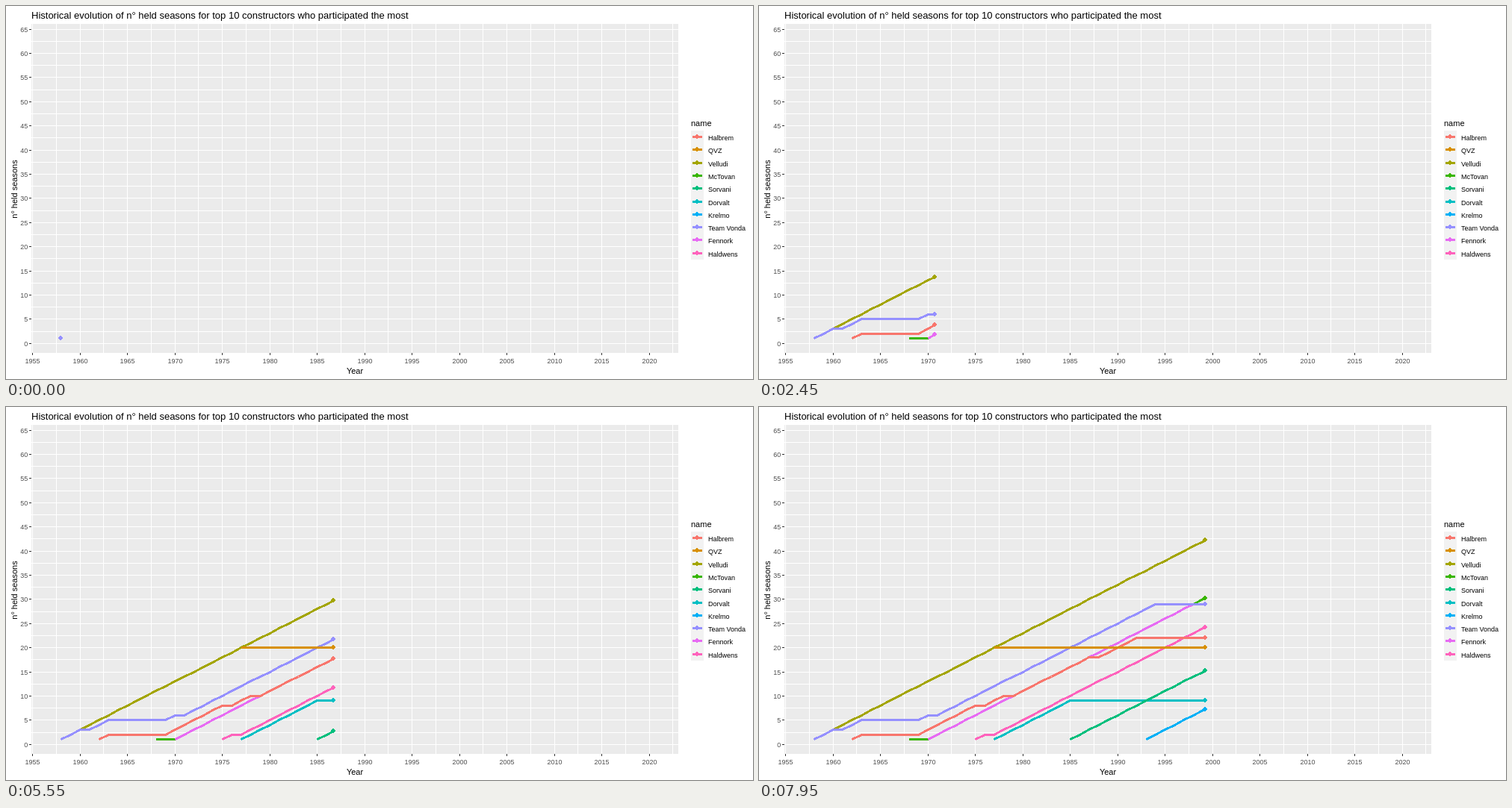
An HTML page for the animation above (8 s loop, 1000x500 px).

```html
<!DOCTYPE html>
<html lang="en">
<head>
<meta charset="utf-8">
<title>Held seasons</title>
<style>
  html, body { margin: 0; width: 100%; height: 100%; overflow: hidden; background: #fff; }
  svg { display: block; width: 1000px; height: 500px; font-family: "Liberation Sans", Arial, sans-serif; }
  .shapes { shape-rendering: crispEdges; }
  .grid { stroke: #fff; }
  .ticks { stroke: #333; }
  .line { fill: none; stroke-width: 3; stroke-linejoin: round; }
  .axis { font-size: 9px; fill: #4d4d4d; }
  .label { font-size: 9px; }
  .heading { font-size: 11px; }
  .title { font-size: 13px; }
  .mid { text-anchor: middle; }
  .end { text-anchor: end; }
</style>
</head>
<body>
<svg id="chart" viewBox="0 0 1000 500"></svg>
<script>
const LOOP = 8000, STEP = 50, START = 1958, SPAN = 62, FRAMES = 239;
const DOT = 'M-1-3h2v1h1v1h1v2h-1v1h-1v1h-2v-1h-1v-1h-1v-2h1v-1h1z';

// Legend order; knots are [year, seasons], straight in between.
const teams = [
  { name: 'Halbrem', color: '#F8766D', knots: [[1962, 1], [1963, 2], [1969, 2], [1975, 8], [1976, 8], [1978, 10],
    [1979, 10], [1987, 18], [1988, 18], [1992, 22], [2020, 22]] },
  { name: 'QVZ', color: '#D89000', knots: [[1977, 20], [2020, 20]] },
  { name: 'Velludi', color: '#A3A500', knots: [[1958, 1], [2020, 63]] },
  { name: 'McTovan', color: '#39B600', knots: [[1968, 1], [1970, 1], [2020, 51]] },
  { name: 'Sorvani', color: '#00BF7D', knots: [[1985, 1], [2020, 36]] },
  { name: 'Dorvalt', color: '#00BFC4', knots: [[1977, 1], [1985, 9], [2020, 9]] },
  { name: 'Krelmo', color: '#00B0F6', knots: [[1993, 1], [2020, 28]] },
  { name: 'Team Vonda', color: '#9590FF', knots: [[1958, 1], [1960, 3], [1961, 3], [1963, 5], [1969, 5], [1970, 6],
    [1971, 6], [1994, 29], [2020, 29]] },
  { name: 'Fennork', color: '#E76BF3', knots: [[1970, 1], [1998, 29], [2020, 29]] },
  { name: 'Haldwens', color: '#FF62BC', knots: [[1975, 1], [1976, 2], [1977, 2], [2020, 45]] }
];
const drawOrder = [2, 3, 9, 5, 6, 4, 8, 7, 0, 1];

const px = year => Math.floor(35.5 + (year - 1955) * 12.7);
const py = value => Math.floor(452.2 - value * 6.477);

function add(parent, tag, attrs, text) {
  const el = document.createElementNS('http://www.w3.org/2000/svg', tag);
  for (const key in attrs) el.setAttribute(key, attrs[key]);
  if (text !== undefined) el.textContent = text;
  return parent.appendChild(el);
}

const svg = document.getElementById('chart');
const shapes = add(svg, 'g', { class: 'shapes' });
const write = (text, cls, x, y, more) => add(svg, 'text', { class: cls, x, y, ...more }, text);

function drawAxes() {
  add(shapes, 'rect', { x: 34, y: 24, width: 866, height: 441, fill: '#ebebeb' });
  let grid = '', ticks = '';
  for (let v = 0; v <= 65; v += 2.5) {
    const y = py(v);
    grid += `M34 ${y + 0.5}H900`;
    if (v % 5) continue;
    ticks += `M31 ${y + 0.5}H34`;
    write(v, 'axis end', 29.3, y + 4);
  }
  for (let year = 1955; year <= 2022.5; year += 2.5) {
    const x = px(year);
    grid += `M${x + 0.5} 24V465`;
    if (year % 5) continue;
    ticks += `M${x + 0.5} 465V468`;
    write(year, 'axis mid', x + 0.5, 479);
  }
  add(shapes, 'path', { class: 'grid', d: grid });
  add(shapes, 'path', { class: 'ticks', d: ticks });
  write('Historical evolution of n° held seasons for top 10 constructors who participated the most', 'title', 34, 17);
  write('Year', 'heading mid', 467, 493);
  write('n° held seasons', 'heading mid', 0, 0, { transform: 'translate(15 245.5) rotate(-90)' });
}

function drawLegend() {
  write('name', 'heading', 917, 161);
  add(shapes, 'rect', { x: 917, y: 167, width: 17, height: 173, fill: '#f2f2f2' });
  teams.forEach(({ name, color }, i) => {
    const y = Math.floor(175.6 + i * 17.28);
    add(shapes, 'path', { class: 'line', stroke: color, d: `M919 ${y + 0.5}H932` });
    add(shapes, 'path', { d: DOT, fill: color, transform: `translate(925 ${y})` });
    write(name, 'label', 940, y + 5);
  });
}

function valueAt(knots, year) {
  let i = 1;
  while (i < knots.length - 1 && year > knots[i][0]) i++;
  const [x0, v0] = knots[i - 1], [x1, v1] = knots[i];
  return v0 + (v1 - v0) * (year - x0) / (x1 - x0);
}

// Each year begins on a whole step, so years last 3 or 4 steps.
function yearAt(step) {
  const first = n => Math.round(n * FRAMES / SPAN);
  let n = 0;
  while (first(n + 1) <= step) n++;
  return START + n + (step - first(n)) / (first(n + 1) - first(n));
}

drawAxes();
drawLegend();
const series = drawOrder.map(i => teams[i]);
for (const s of series) s.line = add(shapes, 'polyline', { class: 'line', stroke: s.color });
for (const s of series) s.dot = add(shapes, 'path', { d: DOT, fill: s.color });

function draw(step) {
  const now = yearAt(step);
  for (const { knots, line, dot } of series) {
    const begin = knots[0][0], shown = now >= begin;
    line.style.display = dot.style.display = shown ? '' : 'none';
    if (!shown) continue;
    const points = [];
    const push = year => points.push(`${px(year) + 0.5},${py(valueAt(knots, year)) + 0.5}`);
    for (let year = begin; year < now; year++) push(year);
    push(now);
    line.setAttribute('points', points.join(' '));
    dot.setAttribute('transform', `translate(${px(now)} ${py(valueAt(knots, now))})`);
  }
}

let last = -1;
function tick() {
  const step = Math.floor(performance.now() % LOOP / STEP);
  if (step !== last) draw(last = step);
  requestAnimationFrame(tick);
}
tick();
</script>
</body>
</html>
```
